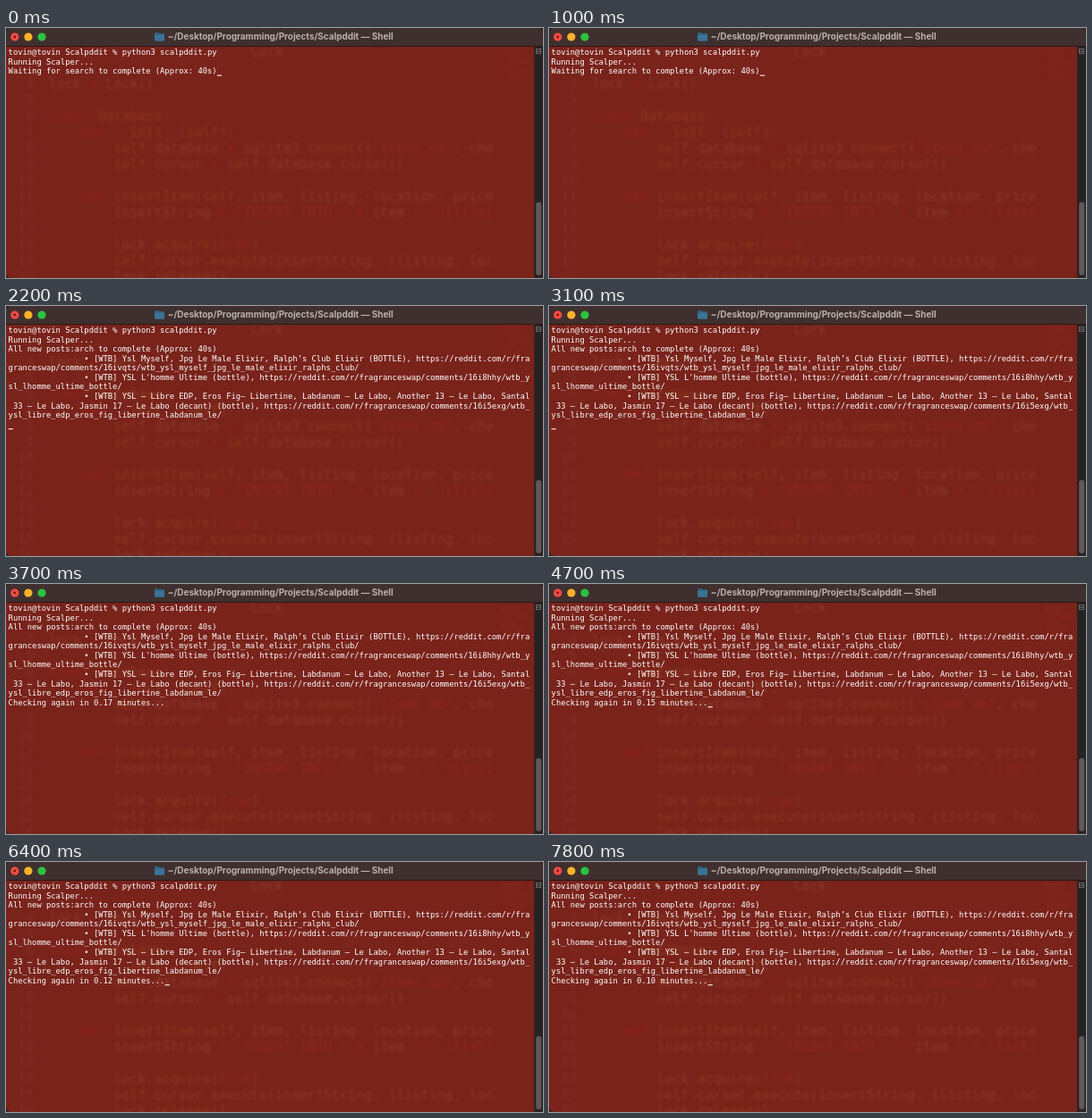
These frames come from a looping animation (600 by 280 pixels, 7900 ms). An HTML page with a canvas:

```html
<!DOCTYPE html>
<html lang="en">
<head>
<meta charset="utf-8">
<title>Terminal</title>
<style>
  html, body { margin: 0; width: 100%; height: 100%; overflow: hidden; background: #262626; }
  canvas { display: block; width: 600px; height: 280px; }
</style>
</head>
<body>
<canvas id="stage" width="600" height="280"></canvas>
<script>
const W = 600, H = 280, LOOP = 7900, STEP = 100;
const MONO = '"DejaVu Sans Mono", monospace';
const CELL = 5.3, ROW = 10.57, LEFT = 2.6, BASE = 30;
const POSTS_AT = 2200, CHECK_AT = 3300;

const ctx = document.getElementById('stage').getContext('2d');
const indent = ' '.repeat(16) + '• ';
const intro = ['tovin@tovin Scalpddit % python3 scalpddit.py', 'Running Scalper...'];
const waiting = 'Waiting for search to complete (Approx: 40s)';
const heading = 'All new posts:';
const posts = [
  indent + '[WTB] Ysl Myself, Jpg Le Male Elixir, Ralph’s Club Elixir (BOTTLE), https://reddit.com/r/fra',
  'granceswap/comments/16ivqts/wtb_ysl_myself_jpg_le_male_elixir_ralphs_club/',
  indent + "[WTB] YSL L'homme Ultime (bottle), https://reddit.com/r/fragranceswap/comments/16i8hhy/wtb_y",
  'sl_lhomme_ultime_bottle/',
  indent + '[WTB] YSL – Libre EDP, Eros Fig– Libertine, Labdanum – Le Labo, Another 13 – Le Labo, Santal',
  ' 33 – Le Labo, Jasmin 17 – Le Labo (decant) (bottle), https://reddit.com/r/fragranceswap/comments/16i5exg/wtb_',
  'ysl_libre_edp_eros_fig_libertine_labdanum_le/'
];

// Code showing through the window, keyed by line number
const code = {
  2: ' '.repeat(25) + 'Lock',
  4: 'lock = Lock()',
  6: 'class Database:',
  7: '    def __init__(self):',
  8: '        self.database = sqlite3.connect("items.db", check',
  9: '        self.cursor = self.database.cursor()',
  11: '    def insertItem(self, item, listing, location, price',
  12: '        insertString = "INSERT INTO " + item + " (listi',
  14: '        lock.acquire(True)',
  15: '        self.cursor.execute(insertString, (listing, loca',
  16: '        lock.release()'
};

function box(g, x, y, w, h, color, r = 0) {
  g.fillStyle = color;
  g.beginPath();
  g.roundRect(x, y, w, h, r);
  g.fill();
}

function dot(g, x, y, r, color) {
  g.fillStyle = color;
  g.beginPath();
  g.arc(x, y, r, 0, Math.PI * 2);
  g.fill();
}

function tokenColor(token) {
  if (/^"|^True/.test(token)) return '#8f281e';
  if (/^(class|def|[=+])$/.test(token)) return '#92211b';
  if (/^(self|Database|__init__|insertItem|connect|acquire|execute|release)$/.test(token)) return '#8f391d';
  return '#8c3a2c';
}

function drawCode(g) {
  g.save();
  g.beginPath();
  g.rect(0, 20, 546, 260);
  g.clip();
  g.filter = 'blur(1.7px)';
  g.font = '15px ' + MONO;
  for (let n = 2; n <= 16; n++) {
    const y = 104 + (n - 6) * 18;
    g.textAlign = 'right';
    g.fillStyle = '#802f26';
    g.fillText(n, 31, y);
    g.textAlign = 'left';
    for (const match of (code[n] || '').matchAll(/"[^"]*"?|\w+|[^\s\w]/g)) {
      g.fillStyle = tokenColor(match[0]);
      g.fillText(match[0], 48 + match.index * 9.03, y);
    }
  }
  g.restore();
}

function drawMinimap(g) {
  g.save();
  g.filter = 'blur(2px)';
  for (let i = 0; i < 6; i++) {
    box(g, 552 + (i % 3) * 3, 24 + i * 6, 26 - (i % 2) * 8, 3, 'rgba(155, 45, 32, 0.4)');
  }
  g.restore();
}

function drawTitle(g) {
  box(g, 0, 0, W, 20.5, '#3f302f');
  box(g, 0, 20, W, 1, '#2c1816');
  ['#fc4b45', '#fcb32a', '#2ac33f'].forEach((color, i) => dot(g, 9.8 + i * 15.1, 10, 4.6, color));
  dot(g, 9.8, 10, 1.4, '#7a1512');
  box(g, 166, 5, 5, 3, '#315f7d', 1);
  box(g, 166, 6, 11, 8.5, '#315f7d', 1);
  box(g, 166, 7.5, 11, 7, '#3c7396', 1);
  g.font = '700 9.92px Inter, sans-serif';
  g.fillStyle = '#b9b0af';
  g.fillText('~/Desktop/Programming/Projects/Scalpddit — Shell', 180.8, 13.4);
}

function drawScrollbar(g) {
  box(g, 590, 21, 10, 260, '#282323');
  box(g, 592.2, 195, 6, 82, '#605957', 3);
  g.strokeStyle = '#7d7674';
  g.lineWidth = 0.8;
  g.strokeRect(592.4, 23.4, 5.2, 5.2);
  box(g, 592.4, 25.6, 5.2, 0.8, '#7d7674');
}

function makeWindow() {
  const layer = document.createElement('canvas');
  layer.width = W;
  layer.height = H;
  const g = layer.getContext('2d');
  g.beginPath();
  g.roundRect(0, 0, W, H, 6);
  g.clip();
  box(g, 0, 0, W, H, '#79231b');
  drawCode(g);
  drawMinimap(g);
  drawTitle(g);
  drawScrollbar(g);
  return layer;
}

function linesAt(t) {
  if (t < POSTS_AT) return [...intro, waiting];
  const lines = [...intro, heading + waiting.slice(heading.length), ...posts];
  if (t < CHECK_AT) return [...lines, ''];
  const seconds = 10 - Math.floor((t - CHECK_AT) / 1000);
  return [...lines, `Checking again in ${(seconds / 60).toFixed(2)} minutes...`];
}

function cursorOn(t) {
  return (t + 140) % 1080 < 540;
}

const backdrop = makeWindow();

function draw(now) {
  const t = Math.floor(now % LOOP / STEP) * STEP;
  const lines = linesAt(t);
  ctx.clearRect(0, 0, W, H);
  ctx.drawImage(backdrop, 0, 0);
  ctx.font = `8.8px ${MONO}`;
  ctx.fillStyle = '#fff';
  lines.forEach((line, i) => ctx.fillText(line, LEFT, BASE + i * ROW));
  if (cursorOn(t)) {
    const last = lines.length - 1;
    box(ctx, LEFT + lines[last].length * CELL, BASE + last * ROW + 1.4, CELL, 1.2, '#f0e4e2');
  }
}

const start = performance.now();
function tick() {
  draw(performance.now() - start);
  requestAnimationFrame(tick);
}
tick();
</script>
</body>
</html>
```
